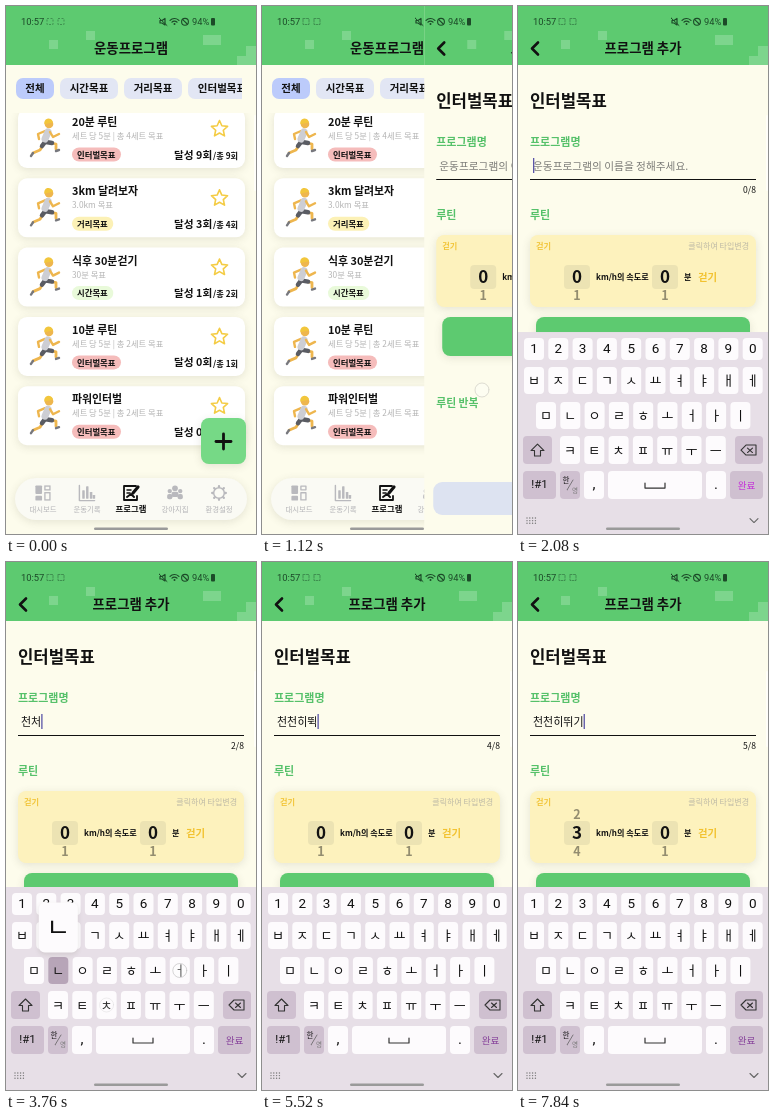
These frames come from a looping animation (250x528 px, 8000 ms). An HTML page with a canvas:

```html
<!DOCTYPE html>
<html lang="ko">
<head>
<meta charset="utf-8">
<title>운동프로그램</title>
<style>
html, body { margin: 0; width: 100%; height: 100%; overflow: hidden; background: #fdfcec; }
canvas { display: block; width: 250px; height: 528px; }
</style>
</head>
<body>
<canvas id="stage"></canvas>
<script>
const LOOP = 8000;
const KR = '"Noto Sans CJK KR", "Noto Sans CJK JP", "Noto Sans CJK SC", "Noto Sans CJK", sans-serif';
const LATIN = 'Roboto, sans-serif';
const GREEN = '#5dca70', CREAM = '#fdfcec', INK = '#111', IDLE = '#b9b9bd';
const PINK = '#f5bcbb', YELLOW = '#fcf1b6', MINT = '#e9fada';

const stage = document.getElementById('stage');
const ratio = window.devicePixelRatio || 1;
stage.width = 250 * ratio;
stage.height = 528 * ratio;
const c = stage.getContext('2d');

const clamp = v => Math.max(0, Math.min(1, v));
const span = (t, a, b) => clamp((t - a) / (b - a));
const easeOut = (p, n = 2) => 1 - (1 - p) ** n;

function text(s, x, y, size, { color = INK, weight = 700, align = 'left', font = KR } = {}) {
  c.font = `${weight} ${size}px ${font}`;
  c.fillStyle = color;
  c.textAlign = align;
  c.textBaseline = 'middle';
  c.fillText(s, x, y);
}

function box(x, y, w, h, r, fill, shadow = 0) {
  c.save();
  if (shadow) {
    c.shadowColor = 'rgba(80,80,60,.14)';
    c.shadowBlur = shadow * ratio;
    c.shadowOffsetY = 2 * ratio;
  }
  c.fillStyle = fill;
  c.beginPath();
  c.roundRect(x, y, w, h, r);
  c.fill();
  c.restore();
}

function line(points, width, color) {
  c.strokeStyle = color;
  c.lineWidth = width;
  c.lineCap = c.lineJoin = 'round';
  c.beginPath();
  points.forEach(([x, y]) => c.lineTo(x, y));
  c.stroke();
}

function disc(x, y, r, fill, stroke, width = 1) {
  c.beginPath();
  c.arc(x, y, r, 0, 7);
  if (fill) { c.fillStyle = fill; c.fill(); }
  if (stroke) { c.strokeStyle = stroke; c.lineWidth = width; c.stroke(); }
}

function at(x, y, scale, draw) {
  c.save();
  c.translate(x, y);
  c.scale(scale, scale);
  draw();
  c.restore();
}

// --- small pictures, centred on the origin ---

function runner() {
  const skin = '#eeb64e', shorts = '#5a5c63', shoe = '#77787e';
  line([[0, -9], [-7, -6], [-6, -1]], 2.4, skin);
  line([[-2, 5], [-5, 10], [-12, 13]], 2.8, skin);
  line([[-12, 13], [-14, 16]], 2.4, shoe);
  line([[6, 3], [11, 4], [11, 9]], 2.8, skin);
  line([[11, 11], [14, 10]], 2.4, shoe);
  line([[0, 2], [-3, 6]], 4.5, shorts);
  line([[1, 2], [7, 3]], 4.5, shorts);
  line([[3, -8], [0, -1]], 7, '#cdced4');
  line([[5, -8], [8, -3], [14, -6]], 2.4, skin);
  disc(4, -16, 4.3, skin);
  c.fillStyle = '#f2c63c';
  c.beginPath();
  c.arc(3.6, -17, 4.4, Math.PI * .9, -.1);
  c.fill();
}

function clock() {
  disc(0, 0, 8.5, '#fbfbfb', '#a9adb0', 2);
  for (let i = 0; i < 12; i++) {
    const a = i * Math.PI / 6;
    disc(6 * Math.sin(a), 6 * Math.cos(a), .5, '#777');
  }
  line([[4, -3], [0, 0], [0, -5]], 1, '#444');
}

function flame(scale, color) {
  at(0, 9 - 9 * scale, scale, () => {
    c.fillStyle = color;
    c.beginPath();
    c.moveTo(-1, -10);
    c.bezierCurveTo(6, -6, 3, -2, 5, -1);
    c.quadraticCurveTo(6, -3, 5, -5);
    c.bezierCurveTo(12, 4, 7, 10, 0, 10);
    c.bezierCurveTo(-8, 10, -10, 3, -6, -3);
    c.quadraticCurveTo(-5, 0, -3, 0);
    c.quadraticCurveTo(-4, -5, -1, -10);
    c.fill();
  });
}

function fire() {
  flame(1, '#f0562b');
  flame(.7, '#fb9d2c');
  flame(.42, '#fde46a');
}

function star() {
  const points = [];
  for (let i = 0; i <= 10; i++) {
    const r = i % 2 ? 4 : 8.5, a = i * Math.PI / 5;
    points.push([r * Math.sin(a), -r * Math.cos(a)]);
  }
  line(points, 1.6, '#f4cc45');
}

const navIcons = [
  () => {
    [[-8, -8, 7, 9], [-8, 3, 7, 5]].forEach(b => box(...b, 1, IDLE));
    c.strokeStyle = IDLE;
    c.lineWidth = 1.4;
    c.strokeRect(2, -7.3, 5.3, 4);
    c.strokeRect(2, -.3, 5.3, 7.6);
  },
  () => {
    line([[-8, -8], [-8, 8], [8, 8]], 1.5, IDLE);
    [[-5, 9], [-1, 13], [3, 7], [6, 4]].forEach(([x, h]) => box(x, 6 - h, 2.6, h, .5, IDLE));
  },
  () => {
    line([[5, -7], [-7, -7], [-7, 7], [6, 7], [6, 3]], 1.8, INK);
    line([[-4, -3], [0, -3]], 1.5, INK);
    line([[-4, 0], [-1, 0]], 1.5, INK);
    line([[-4, 4], [0, 1], [3, 4]], 2, INK);
    line([[7, -6], [2, 0]], 3.2, INK);
  },
  () => {
    [[-5.5, -2, 2.3], [5.5, -2, 2.3], [0, -5, 3]].forEach(([x, y, r]) => {
      disc(x, y, r, IDLE);
      box(x - r * 1.2, y + r + .8, r * 2.4, 5.5, 2, IDLE);
    });
  },
  () => {
    for (let i = 0; i < 8; i++) {
      const a = i * Math.PI / 4;
      line([[6.4 * Math.cos(a), 6.4 * Math.sin(a)], [7.2 * Math.cos(a), 7.2 * Math.sin(a)]], 2.4, IDLE);
    }
    disc(0, 0, 5.6, null, IDLE, 1.6);
  }
];

// --- screens ---

function header(title) {
  c.fillStyle = CREAM;
  c.fillRect(0, 0, 250, 528);
  c.fillStyle = GREEN;
  c.fillRect(0, 0, 250, 59);
  c.fillStyle = 'rgba(255,255,255,.2)';
  [[43, 34, 9, 9], [80, 25, 9, 9], [197, 29, 18, 10], [231, 50, 19, 9], [240, 40, 10, 10]]
    .forEach(b => c.fillRect(...b));
  text(title, 125, 42, 13.4, { weight: 900, align: 'center' });
}

function scrollBar() {
  box(248, 109, 2, 76, 1, 'rgba(255,255,255,.7)');
}

const badges = { 인터벌목표: PINK, 거리목표: YELLOW, 시간목표: MINT };
const programs = [
  ['20분 루틴', '세트 당 5분 | 총 4세트 목표', '인터벌목표', 9, 9],
  ['3km 달려보자', '3.0km 목표', '거리목표', 3, 4],
  ['식후 30분걷기', '30분 목표', '시간목표', 1, 2],
  ['10분 루틴', '세트 당 5분 | 총 2세트 목표', '인터벌목표', 0, 1],
  ['파워인터벌', '세트 당 5분 | 총 2세트 목표', '인터벌목표', 0, 2]
];

function programCard([name, detail, goal, done, total], i) {
  c.save();
  c.translate(0, i * 69.3);
  box(12, 103, 227, 59, 9, '#fff', 8);
  at(39, 134, 1, runner);
  text(name, 66, 116, 10.9, { weight: 900 });
  text(detail, 66, 130, 8.3, { color: '#b4b4b4', weight: 400 });
  box(66, 141.5, goal.length * 7.7 + 10.5, 14, 7, badges[goal]);
  text(goal, 71, 148.5, 8.4);
  at(213.5, 123, 1, star);
  text('달성 ' + done + '회', 168, 148.5, 10.7, { weight: 900 });
  text('/총 ' + total + '회', 232, 149.5, 8.2, { align: 'right' });
  c.restore();
}

function clipped(x, y, w, h, draw) {
  c.save();
  c.beginPath();
  c.rect(x, y, w, h);
  c.clip();
  draw();
  c.restore();
}

function listScreen(open) {
  header('운동프로그램');
  clipped(0, 60, 236, 40, () => {
    [['전체', 10, 38], ['시간목표', 54, 58], ['거리목표', 118, 58], ['인터벌목표', 182, 68]]
      .forEach(([label, x, w], i) => {
        box(x, 72, w, 21, 7, i ? '#e2e6f4' : '#bccbfb');
        text(label, x + w / 2, 82, 10.5, { align: 'center' });
      });
  });
  clipped(0, 107, 250, 361, () => programs.forEach(programCard));

  c.fillStyle = `rgba(0,0,0,${.5 * open})`;
  c.fillRect(0, 59, 250, 409);
  scrollBar();

  box(9, 472, 232, 42, 21, '#fafaf4', 8);
  ['대시보드', '운동기록', '프로그램', '강아지집', '환경설정'].forEach((label, i) => {
    const x = 37 + i * 44, on = i == 2;
    at(x, 487, on ? 1 : .95, navIcons[i]);
    text(label, x, 503, on ? 8.4 : 7.4,
      { align: 'center', color: on ? INK : '#b3b3b6', weight: on ? 700 : 400 });
  });

  if (open > 0) {
    c.save();
    c.globalAlpha = open;
    [['시간목표', 296, MINT, clock, 1], ['거리목표', 338, YELLOW, runner, .55], ['인터벌', 381, PINK, fire, .9]]
      .forEach(([label, y, fill, icon, scale]) => at(217.5, 435 + (y - 435) * open, .4 + .6 * open, () => {
        box(-18.5, -18, 37, 36, 8, fill);
        at(0, -5, scale, icon);
        text(label, 0, 9, 8.3, { align: 'center' });
      }));
    c.restore();
  }

  box(195, 412, 45, 46, 8, '#76d986', 8);
  c.save();
  c.translate(217.5, 435.5);
  c.rotate(open * Math.PI / 4);
  line([[-7.5, 0], [7.5, 0]], 2.8, INK);
  line([[0, -7.5], [0, 7.5]], 2.8, INK);
  c.restore();
}

function picker(x, value) {
  box(x - 13, 259, 26, 24, 4, '#ece3b3');
  clipped(x - 13, 245, 26, 51, () => {
    for (let n = Math.max(0, Math.floor(value) - 1); n <= value + 2; n++) {
      const d = n - value, far = Math.min(1, Math.abs(d));
      const alpha = (1 - .55 * far) * clamp(2 - Math.abs(d));
      text(n, x, 271 + d * 18.5, 17 - 4.5 * far, { align: 'center', color: `rgba(17,17,17,${alpha})` });
    }
  });
}

function addScreen(typed, caret, speed) {
  header('프로그램 추가');
  line([[20, 36.5], [14, 42.5], [20, 48.5]], 2.6, INK);
  text('인터벌목표', 12, 95, 16.7, { weight: 900 });
  text('프로그램명', 12, 136, 11, { color: '#56c16a', weight: 900 });
  if (typed) text(typed, 15, 160, 11, { weight: 400 });
  else text('운동프로그램의 이름을 정해주세요.', 15, 160, 10.7, { color: '#7c7c78', weight: 400 });
  if (caret) {
    c.font = '400 11px ' + KR;
    c.fillStyle = '#5b55a8';
    c.fillRect(15 + c.measureText(typed).width, 152, 1.3, 15);
  }
  c.fillStyle = INK;
  c.fillRect(12, 173, 226, 1);
  text(typed.length + '/8', 238, 183.5, 8.6, { align: 'right', weight: 400 });
  text('루틴', 12, 209, 11, { color: '#56c16a', weight: 900 });

  box(12, 229, 226, 72, 8, '#fdf2bd', 8);
  text('걷기', 18, 240, 8.2, { color: '#f2c53a' });
  text('클릭하여 타입변경', 231, 240, 8, { color: '#bdb9a6', weight: 400, align: 'right' });
  picker(59, speed);
  text('km/h의 속도로', 78, 271, 8.1);
  picker(147, 0);
  text('분', 166, 271, 8.1);
  text('걷기', 180, 271, 10.4, { color: '#f2c230', weight: 900 });

  box(18, 311, 214, 39, 8, GREEN, 8);
  text('루틴 반복', 12, 397, 10.8, { color: '#56c16a', weight: 900 });
  box(9, 476, 232, 33, 9, '#dde3f1');
  scrollBar();
}

// --- keyboard ---

const rows = [
  ['1234567890', 16, 331, 22],
  ['ㅂㅈㄷㄱㅅㅛㅕㅑㅐㅔ', 16, 360, 27],
  ['ㅁㄴㅇㄹㅎㅗㅓㅏㅣ', 28, 395, 27],
  ['ㅋㅌㅊㅍㅠㅜㅡ', 52, 429, 28]
];
const SHIFTED = 'ㅃㅉㄸㄲㅆㅛㅕㅑㅒㅖ';
const PITCH = 24.3;

// time, key, text after the key
const strokes = [
  [2720, 'ㅊ', 'ㅊ'], [2960, 'ㅓ', '처'], [3200, 'ㄴ', '천'],
  [3430, 'ㅊ', '천ㅊ'], [3570, 'ㅓ', '천처'], [3740, 'ㄴ', '천천'],
  [4020, 'ㅎ', '천첞'], [4220, 'ㅣ', '천천히'], [4400, '⇧', '천천히'],
  [4560, 'ㄸ', '천천히ㄸ'], [4760, 'ㅜ', '천천히뚜'], [4940, 'ㅣ', '천천히뛰'],
  [5110, 'ㄱ', '천천히뛱'], [5820, 'ㅣ', '천천히뛰기']
];

function keyCentre(key) {
  if (key == '⇧') return [19, 443];
  for (const [letters, x, y, h] of rows) {
    const i = letters.indexOf(key == 'ㄸ' ? 'ㄷ' : key);
    if (i >= 0) return [x + i * PITCH, y + h / 2];
  }
}

function keyboard(t, hasText) {
  const held = strokes.find(([start]) => t >= start && t < start + 160);
  const shift = t >= 4440 && t < 4680;
  const dim = '#cfc0d0', dark = '#b7a5b8', pale = '#fdfbfd';
  c.fillStyle = '#e7dfe7';
  c.fillRect(0, 325, 250, 203);
  rows.forEach(([letters, x0, y, h], r) => {
    [...(r == 1 && shift ? SHIFTED : letters)].forEach((letter, i) => {
      const x = x0 + i * PITCH;
      box(x - 10, y, 20, h, 4, held && held[1] == letter ? dark : pale);
      text(letter, x, y + h / 2, r ? 13 : 13.5,
        { align: 'center', weight: 400, font: r ? KR : LATIN });
    });
  });

  box(5, 429, 29, 28, 4, shift || held && held[1] == '⇧' ? dark : dim);
  line([[19.5, 437], [13, 443.5], [16.5, 443.5], [16.5, 449], [22.5, 449], [22.5, 443.5], [26, 443.5], [19.5, 437]], 1.1, '#333');
  box(217, 429, 28, 28, 4, dim);
  line([[223, 443], [228, 438], [238, 438], [238, 448], [228, 448], [223, 443]], 1.1, '#333');
  line([[229.5, 441], [234.5, 445.5]], 1.1, '#333');
  line([[234.5, 441], [229.5, 445.5]], 1.1, '#333');

  [[5, 33, dim], [42, 20, dim], [66, 20, pale], [90, 94, pale], [188, 20, pale], [212, 33, dim]]
    .forEach(([x, w, fill]) => box(x, 464, w, 28, 4, fill));
  const mid = { align: 'center', weight: 400 };
  text('!#1', 21.5, 478, 11.5, { ...mid, font: LATIN });
  text('한', 48, 473, 7.5, mid);
  text('영', 57, 483, 6.5, { ...mid, color: '#777' });
  line([[49, 483], [55, 473]], .7, '#555');
  text(',', 76, 478, 15, { ...mid, font: LATIN });
  text('.', 198, 478, 15, { ...mid, font: LATIN });
  line([[127, 476], [127, 481], [147, 481], [147, 476]], 1.2, '#333');
  text('완료', 228.5, 478, 9.6, { ...mid, color: hasText ? '#86419a' : '#c42fd8' });

  for (let i = 0; i < 12; i++) disc(9 + i % 4 * 2.8, 511 + (i >> 2) * 2.6, .7, '#777');
  line([[232, 511.5], [236, 515.5], [240, 511.5]], 1.1, '#666');

  if (held && held[1] != '⇧') {
    const [x, y] = keyCentre(held[1]);
    const left = Math.max(3, Math.min(208, x - 19.5));
    box(left, y - 68, 39, 50, 6, pale, 5);
    text(held[1], left + 19.5, y - 43, 26, mid);
  }
}

// --- system layer ---

function statusBar() {
  const ink = '#1c4a28', soft = 'rgba(28,74,40,.45)';
  text('10:57', 15, 16, 9.4, { color: ink, weight: 400, font: LATIN });
  c.setLineDash([2, 1.5]);
  [41, 52].forEach(x => {
    c.strokeStyle = soft;
    c.lineWidth = 1;
    c.strokeRect(x, 12.5, 6, 6);
  });
  c.setLineDash([]);
  line([[154, 14.5], [156, 14.5], [159, 12.5], [159, 19], [156, 17], [154, 17], [154, 14.5]], 1.2, ink);
  line([[153, 12], [161, 19.5]], 1, ink);
  [6, 3.4].forEach(r => {
    c.strokeStyle = ink;
    c.lineWidth = 1.2;
    c.beginPath();
    c.arc(168.5, 18.5, r, -2.4, -.74);
    c.stroke();
  });
  disc(168.5, 18, 1, ink);
  disc(179, 15.8, 3.4, null, ink, 1.1);
  line([[176.8, 13.6], [181.2, 18]], 1.1, ink);
  text('94%', 186, 16, 9.3, { color: ink, weight: 400, font: LATIN });
  box(205, 12, 4, 7.5, 1, ink);
}

const taps = [[80, 217, 436], [880, 220, 384], [1680, 100, 160],
  ...strokes.map(([time, key]) => [time, ...keyCentre(key)])];

function touch(x, y, alpha) {
  c.save();
  c.globalAlpha = alpha;
  disc(x, y, 7, 'rgba(255,255,255,.4)', 'rgba(110,110,110,.45)', .8);
  c.restore();
}

function draw(t) {
  c.setTransform(ratio, 0, 0, ratio, 0, 0);

  const open = easeOut(span(t, 180, 700), 3) * (1 - span(t, 900, 1080));
  const slide = easeOut(span(t, 1044, 1440));
  if (slide < 1) listScreen(open);

  if (slide > 0) {
    const last = strokes.filter(([start]) => t >= start + 100).pop();
    const typed = last ? last[2] : '';
    const pressed = strokes.filter(([start]) => t >= start).pop();
    const since = t - (pressed ? pressed[0] : 1680);
    const caret = since >= 0 && since % 1000 < 500;
    const speed = 3 * easeOut(span(t, 6400, 7040));
    c.save();
    c.translate(250 * (1 - slide), 0);
    addScreen(typed, caret, speed);
    c.restore();

    const rise = easeOut(span(t, 1700, 2220), 4);
    if (rise > 0) {
      c.save();
      c.translate(0, 203 * (1 - rise));
      keyboard(t, typed !== '');
      c.restore();
    }
  }

  statusBar();
  box(88, 521.5, 74, 2.5, 1.2, '#9a9a9a');

  taps.forEach(([start, x, y]) => {
    const age = t - start;
    if (age >= 60 && age < 400) touch(x, y, 1 - (age / 400) ** 2);
  });
  if (t >= 6360 && t < 7000) touch(59, 288 - 52 * easeOut(span(t, 6400, 6760)), 1 - span(t, 6760, 7000));
}

function frame(now) {
  draw(now % LOOP);
  requestAnimationFrame(frame);
}
requestAnimationFrame(frame);
</script>
</body>
</html>
```
